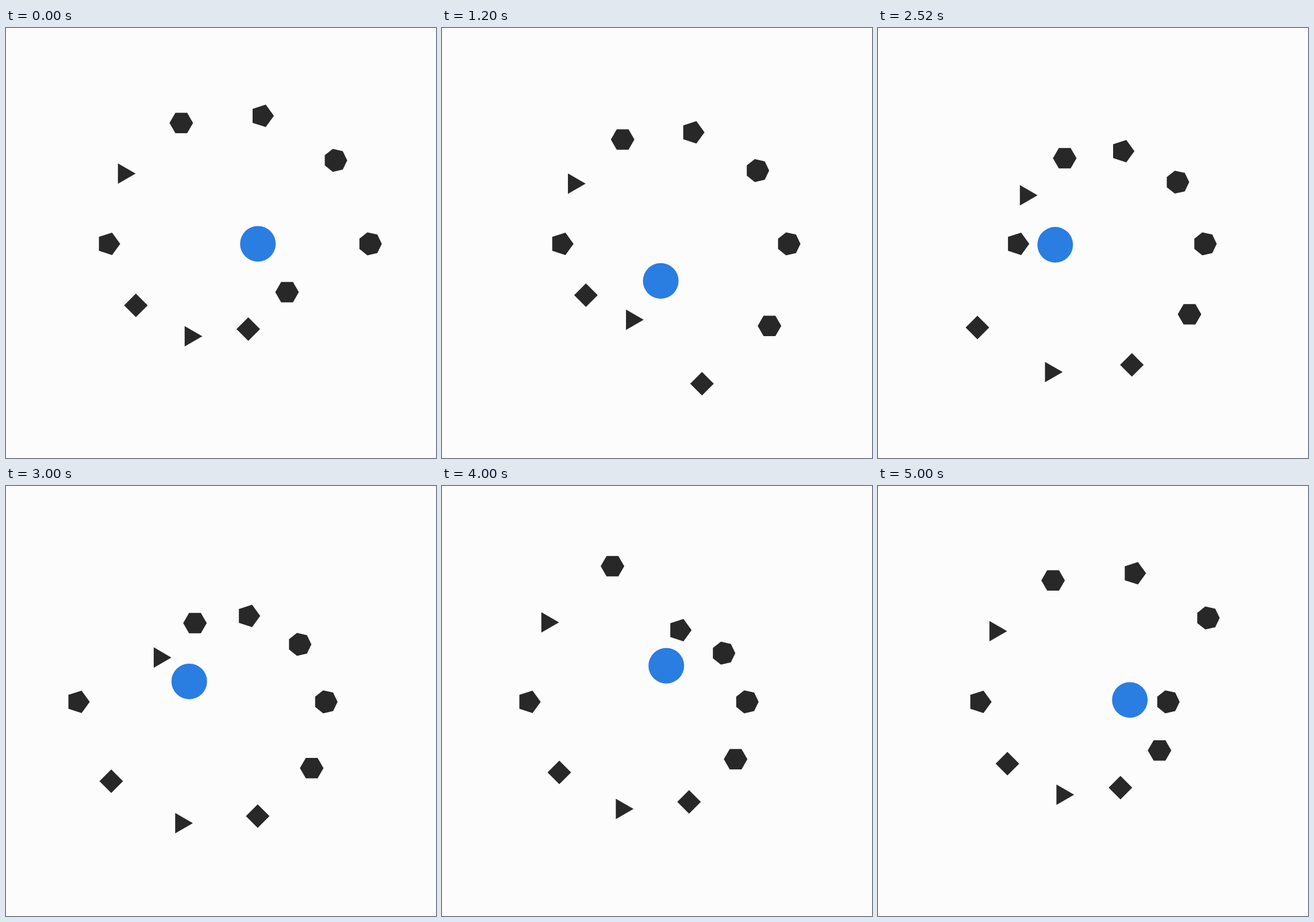
Recreate the animation shown at these times as an HTML page with a canvas. Size 748 by 748 pixels, loop 5.04 s.

```html
<!DOCTYPE html>
<html lang="en">
<head>
<meta charset="utf-8">
<title>Orbiting polygons</title>
<style>
  html, body { margin: 0; width: 100%; height: 100%; overflow: hidden; background: #fcfcfc; }
  canvas { display: block; width: 748px; height: 748px; }
</style>
</head>
<body>
<canvas id="stage" width="748" height="748"></canvas>
<script>
const ctx = document.getElementById('stage').getContext('2d');
const TAU = Math.PI * 2;
const STEP = 40, STEPS = 125, LOOP = 5040;
const CX = 373.2, CY = 375.4;
const OUTER = 260, INNER = 130, ORBIT = 65;
const SIZE = 20.5, BALL = 31;
const SIDES = [7, 6, 4, 3, 4, 5, 3, 6, 5, 7];

const around = (x, y, r, a) => [x + r * Math.cos(a), y + r * Math.sin(a)];

function polygon(x, y, sides) {
  ctx.beginPath();
  for (let i = 0; i < sides; i++) ctx.lineTo(...around(x, y, SIZE, TAU * i / sides));
  ctx.fill();
}

function draw(time) {
  // The first pose is held for two steps.
  const k = Math.max(0, Math.floor(time % LOOP / STEP) - 1);
  const n = SIDES.length, cycle = STEPS * n;

  ctx.fillStyle = '#fcfcfc';
  ctx.fillRect(0, 0, 748, 748);

  // Each polygon drifts inward and snaps back out as the ball passes its angle.
  ctx.fillStyle = '#282828';
  SIDES.forEach((sides, i) => {
    const age = (k * n - i * STEPS + cycle) % cycle / cycle;
    const r = OUTER - (OUTER - INNER) * age;
    polygon(...around(CX, CY, r, TAU * i / n), sides);
  });

  ctx.fillStyle = '#2a7de1';
  ctx.beginPath();
  ctx.arc(...around(CX, CY, ORBIT, TAU * k / STEPS), BALL, 0, TAU);
  ctx.fill();
}

const start = performance.now();
function tick() {
  draw(performance.now() - start);
  requestAnimationFrame(tick);
}
tick();
</script>
</body>
</html>
```
